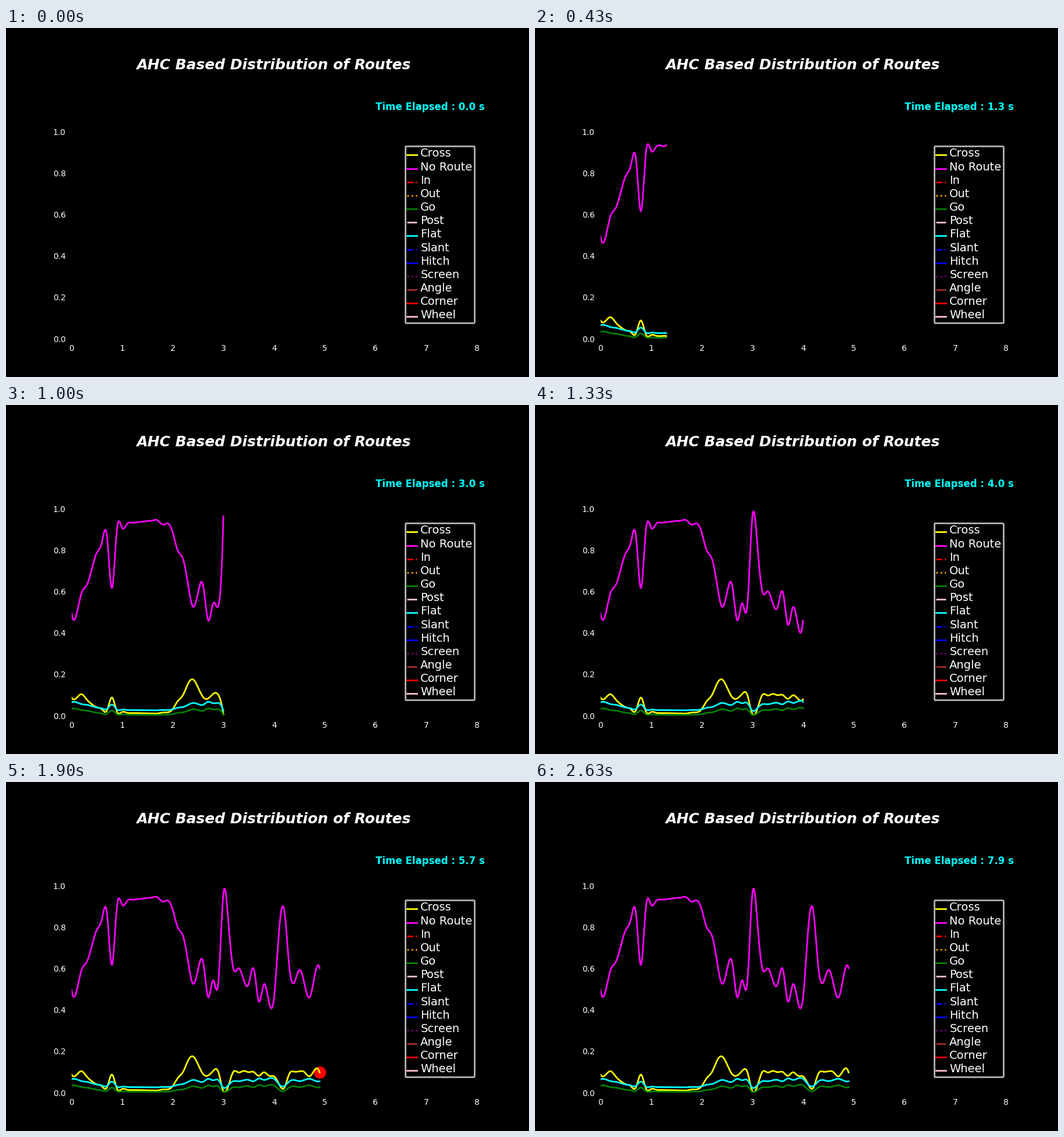
Recreate the animation shown at these times as a matplotlib script. Size 900 by 600 pixels, loop 2660 ms.

```python
import numpy as np
import matplotlib.pyplot as plt
from matplotlib.animation import FuncAnimation
from matplotlib.lines import Line2D

LOOP_MS = 2660
TICK_MS = 20
STEP = 0.1
SAMPLES = 300
DOT_STEPS = range(50, 70)

ROUTES = [
    ("Cross", "yellow", "-"),
    ("No Route", "magenta", "-"),
    ("In", "red", "--"),
    ("Out", "orange", ":"),
    ("Go", "green", "-"),
    ("Post", "pink", "-."),
    ("Flat", "cyan", "-"),
    ("Slant", "blue", "--"),
    ("Hitch", "blue", "-"),
    ("Screen", "purple", ":"),
    ("Angle", "brown", "-."),
    ("Corner", "red", "-"),
    ("Wheel", "pink", "-"),
]

# Turning points (seconds, probability) of the "No Route" curve.
TURNS = [
    (0, .498), (.05, .465), (.25, .617), (.56, .805), (.67, .91),
    (.805, .615), (.93, .95), (1.01, .907), (1.14, .933), (1.7, .945),
    (1.8, .924), (1.91, .93), (2.17, .77), (2.42, .522), (2.57, .655),
    (2.71, .458), (2.81, .547), (2.88, .5), (3.01, .972), (3.22, .587),
    (3.3, .602), (3.47, .512), (3.59, .602), (3.71, .437), (3.82, .533),
    (3.95, .39), (4.17, .91), (4.36, .52), (4.51, .595), (4.69, .458),
    (4.87, .616), (4.9, .602),
]


def ease_through(points, t):
    """Smoothstep from one turning point to the next."""
    x, y = np.array(points).T
    k = np.clip(np.searchsorted(x, t, side="right") - 1, 0, len(x) - 2)
    s = np.clip((t - x[k]) / (x[k + 1] - x[k]), 0, 1)
    return y[k] + (y[k + 1] - y[k]) * s * s * (3 - 2 * s)


def spline(y, u):
    """Not-a-knot cubic through y at 0, 1, 2, ... evaluated at u."""
    n = len(y)
    if n < 4:
        return np.polyval(np.polyfit(np.arange(n), y, n - 1), u)
    a = np.zeros((n, n))
    b = np.zeros(n)
    for k in range(1, n - 1):
        a[k, k - 1:k + 2] = 1, 4, 1
        b[k] = 6 * (y[k - 1] - 2 * y[k] + y[k + 1])
    a[0, :3] = a[-1, -3:] = 1, -2, 1
    m = np.linalg.solve(a, b)
    k = np.clip(u.astype(int), 0, n - 2)
    t = u - k
    s = 1 - t
    return (s * y[k] + t * y[k + 1]
            + ((s**3 - s) * m[k] + (t**3 - t) * m[k + 1]) / 6)


# The other routes share what "No Route" leaves over.
times = np.arange(50) * STEP
no_route = ease_through(TURNS, times)
rest = 1 - no_route
share = np.interp(no_route, [0.47, 0.58, 0.65], [0.145, 0.27, 0.19])
share += 0.23 * np.exp(-((times - 2.25) / 0.25) ** 2)
cross = share * rest
series = [(cross, "yellow"), (no_route, "magenta"),
          (0.065 * rest, "green"), (0.021 + 0.085 * rest, "cyan")]

fig = plt.figure(figsize=(9, 6), dpi=100, facecolor="black")
ax = fig.add_axes([0.125, 0.11, 0.775, 0.77], facecolor="black")
ax.set_xlim(0, 8)
ax.set_ylim(0, 1.3)
ax.set_xticks(range(9))
ax.set_yticks(np.arange(6) * 0.2)
ax.tick_params(color="black", labelcolor="white", labelsize=10)
for spine in ax.spines.values():
    spine.set_visible(False)

ax.text(0.5, 1.0025, "AHC Based Distribution of Routes",
        transform=ax.transAxes, ha="center", color="white",
        fontsize=18, weight="bold", style="italic")
clock = ax.text(0.75, 0.85, "", transform=ax.transAxes, color="cyan",
                fontsize=12, weight="bold")

handles = [Line2D([], [], color=color, linestyle=style, lw=2, label=name)
           for name, color, style in ROUTES]
legend = ax.legend(handles=handles, fontsize=6, loc="lower right",
                   bbox_to_anchor=(1, 0.05), facecolor="black",
                   edgecolor="#b4b4b4", framealpha=1, labelcolor="white")
legend.get_frame().set_linewidth(2)
for label in legend.get_texts():
    label.set_fontsize(14)

lines = [ax.plot([], [], color=color, lw=2)[0] for _, color in series]
dot, = ax.plot(times[-1:], cross[-1:], "o", color="red", ms=14, zorder=1)


def update(tick):
    # Thirty steps a second, each start rounded to 10 ms.
    step = int(0.6 * tick + 0.45)
    last = min(step, len(times) - 1)
    u = np.linspace(0, last, SAMPLES)
    for line, (values, _) in zip(lines, series):
        if last:
            line.set_data(u * STEP, spline(values[:last + 1], u))
        else:
            line.set_data([], [])
    dot.set_visible(step in DOT_STEPS)
    clock.set_text(f"Time Elapsed : {step * STEP:.1f} s")
    return [*lines, dot, clock]


anim = FuncAnimation(fig, update, frames=LOOP_MS // TICK_MS, interval=TICK_MS,
                     repeat=True, repeat_delay=0)
plt.show()
```
